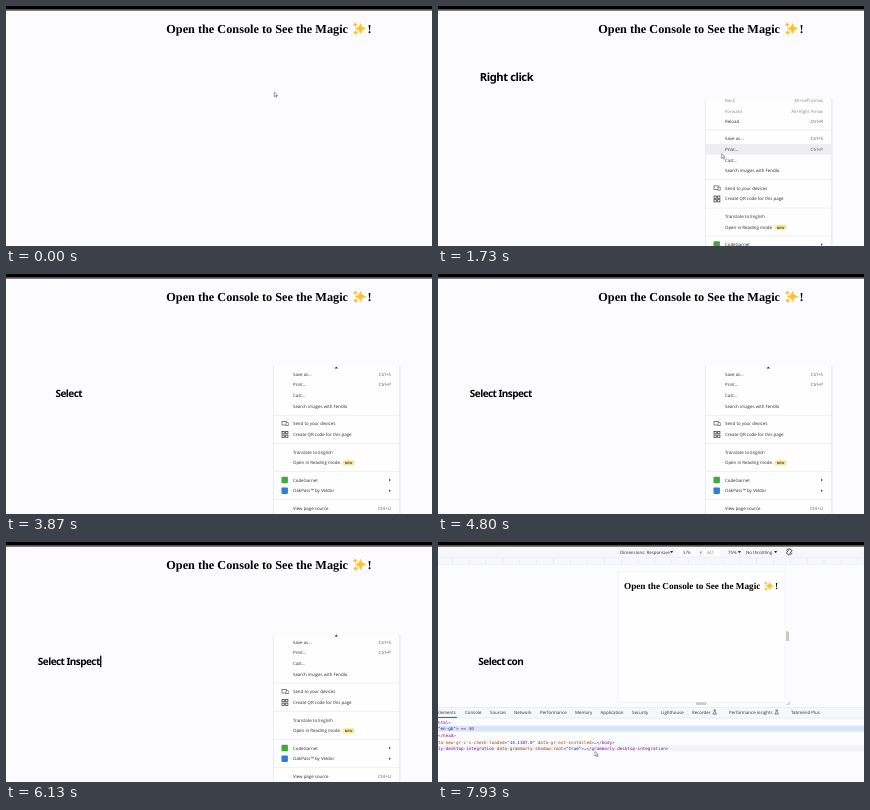
An HTML page that plays this animation: 426 by 240 pixels, repeating every 8000 ms.

```html
<!DOCTYPE html>
<html lang="en">
<head>
<meta charset="utf-8">
<title>Open the Console</title>
<style>
  html, body { margin: 0; width: 100%; height: 100%; overflow: hidden; background: #fcfcfe; }
  svg { display: block; width: 100vw; height: 100vh; }
  text { white-space: pre; text-rendering: geometricPrecision; }
  .caption { font-family: "Noto Sans", sans-serif; font-weight: 800; text-anchor: middle; }
  .menu text, .tools text { font: 4.4px "Open Sans", sans-serif; fill: #2c2c30; }
  .menu .key { text-anchor: end; fill: #55555a; }
  .menu .off { fill: #87878c; }
  .menu .badge { font-size: 3.2px; font-weight: 700; text-anchor: middle; fill: #5b4a10; }
  .tools .code { font: 4.26px "DejaVu Sans Mono", monospace; fill: #881280; }
  .tools .attr { fill: #994500; }
  .tools .val { fill: #1a1aa6; }
  svg text.title { font: bold 12.25px "Liberation Serif", serif; fill: #000; }
</style>
</head>
<body>
<svg id="stage" viewBox="0 0 426 240" preserveAspectRatio="none"></svg>
<script>
const LOOP = 8000, CUT_2 = 3070, CUT_3 = 6200;
const stage = document.getElementById('stage');

const rect = (x, y, w, h, fill, more = '') =>
  `<rect x="${x}" y="${y}" width="${w}" height="${h}" fill="${fill}" ${more}/>`;
const text = (x, y, str, more = '') => `<text x="${x}" y="${y}" ${more}>${str}</text>`;
const path = (d, fill, more = '') => `<path d="${d}" fill="${fill}" ${more}/>`;
const star = (x, y, r) => path(
  `M${x} ${y - r}Q${x + r * .18} ${y - r * .18} ${x + r} ${y}Q${x + r * .18} ${y + r * .18} ${x} ${y + r}` +
  `Q${x - r * .18} ${y + r * .18} ${x - r} ${y}Q${x - r * .18} ${y - r * .18} ${x} ${y - r}Z`,
  '#fdc02f', 'stroke="#fdc02f" stroke-width=".4"');
const down = (x, y) => path(`M${x} ${y}h3.2l-1.6 2.2z`, '#333');

const title =
  text(0, 0, 'Open the Console to See the Magic', 'class="title"') +
  star(194.2, -4.1, 5.3) + star(189, -7.8, 2.2) + star(189.4, 0, 2.4) +
  text(201.2, 0, '!', 'class="title"');

// Context menu: [centre y, label, shortcut, extra]
const rows = [
  [94, 'Back', 'Alt+Left arrow', 'off'],
  [105, 'Forward', 'Alt+Right Arrow', 'off'],
  [115.5, 'Reload', 'Ctrl+R'],
  [132.5, 'Save as...', 'Ctrl+S'],
  [143.2, 'Print...', 'Ctrl+P'],
  [154, 'Cast...'],
  [164.8, 'Search images with Fendlo'],
  [182, 'Send to your devices', '', 'device'],
  [192.8, 'Create QR code for this page', '', 'code'],
  [210.5, 'Translate to English'],
  [221.3, 'Open in Reading mode', '', 'new'],
  [238.5, 'CodeGarnet', '', '#43a83c'],
  [249.2, 'OakPass™ by Veldor', '', '#2b7fd6'],
  [266.5, 'View page source', 'Ctrl+U'],
  [277.3, 'Inspect']
];
const extras = {
  device: rect(276, 179.9, 4.6, 3.6, 'none', 'stroke="#555" stroke-width=".7"') +
    rect(280, 181.2, 2.2, 3, '#fff', 'stroke="#555" stroke-width=".6"'),
  code: [[276, 190], [279.6, 190], [276, 193.6], [279.6, 193.6]].map(([x, y]) =>
    rect(x, y, 2.3, 2.3, 'none', 'stroke="#444" stroke-width=".8"')).join(''),
  new: rect(336.5, 218.8, 12, 5, '#fbe7a0', 'rx="1"') +
    text(342.5, 222.6, 'NEW', 'class="badge"')
};
const menuRow = ([y, label, key = '', kind = '']) => {
  const dim = kind === 'off' ? 'off' : '';
  const addon = kind[0] === '#'
    ? rect(275.5, y - 3.2, 6.4, 6.4, kind, 'rx=".8"') + path(`M383 ${y - 1.3}l1.9 1.3l-1.9 1.3z`, '#6b3038')
    : extras[kind] || '';
  return text(287, y + 1.6, label, `class="${dim}"`) +
    text(385, y + 1.6, key, `class="key ${dim}"`) + addon;
};
const lines = [123.8, 173.4, 201.8, 229.8, 257.8]
  .map(y => rect(268, y, 126, .5, '#e2e2e8')).join('');

// Developer tools
const tabs = [[-1, 'Elements'], [27, 'Console'], [52, 'Sources'], [76, 'Network'],
  [102, 'Performance'], [137, 'Memory'], [162.5, 'Application'], [194, 'Security'],
  [223, 'Lighthouse'], [254, 'Recorder'], [291, 'Performance insights'], [353, 'Tabmend Plus']];
const flask = x => path(`M${x} 168h2.4m-1.7 0v1.6l-1.3 2.5h3.6l-1.3-2.5v-1.6`, 'none',
  'stroke="#444" stroke-width=".6"');
const span = (cls, str) => `<tspan class="${cls}">${str}</tspan>`;
const code = (y, str) => text(0, y, str, 'class="code"');
const ticks = Array.from({ length: 26 }, (_, i) =>
  rect(i * 16.9 + 14, i % 3 ? 18.5 : 15.5, .4, i % 3 ? 3.5 : 6.5, '#dddde2')).join('');

const toolbar =
  rect(0, 4, 426, 18.4, '#f6f7fb') +
  rect(0, 15, 426, .4, '#e6e6ea') + rect(0, 22.2, 426, .4, '#e6e6ea') + ticks +
  text(182, 11.6, 'Dimensions: Responsive') + down(232, 9) +
  rect(241.5, 6.2, 16, 7.6, '#fff') +
  text(245, 11.6, '576') + text(261.5, 11.6, '×') +
  rect(266, 6.2, 15.5, 7.6, '#fff') +
  text(268.5, 11.6, '441', 'opacity=".55"') +
  text(290, 11.6, '75%') + down(299.8, 9) +
  text(308, 11.6, 'No throttling') + down(336, 9) +
  rect(349.6, 7, 3.2, 5.6, 'none', 'rx=".6" stroke="#333" stroke-width=".8" transform="rotate(35 351.2 9.8)"') +
  path('M348.3 8.8q.4-2 2.3-2.2M354 10.8q-.4 2-2.3 2.2', 'none', 'stroke="#333" stroke-width=".6"');

const page =
  rect(180, 30, 167, 130, '#fefefe', 'stroke="#f0f0f4" stroke-width=".5"') +
  `<g transform="translate(186 47) scale(.75)">${title}</g>` +
  rect(348, 89.5, 3, 9.5, '#c9c9bd') + rect(258, 160.3, 10.5, 2.6, '#c9c9bd') +
  path('M348.5 163l3.4-3.4M350.4 163l1.5-1.5', 'none', 'stroke="#777" stroke-width=".5"');

const highlight =
  rect(180, 30, 166, 25.2, '#6fa8dc', 'opacity=".66"') +
  rect(180.5, 58, 48.5, 12.2, '#fff', 'rx="1.5" stroke="#c8c8d2" stroke-width=".6"') +
  path('M184 58l2.5-2.6l2.5 2.6z', '#fff') +
  text(184, 65.8, 'html', 'style="font-weight:700;fill:#881280"') +
  text(199.5, 65.8, '576 × 85.28');

const panel =
  rect(0, 165.5, 426, 75, '#fcfcfe') + rect(0, 165.3, 426, .5, '#d6d7dd') +
  rect(0, 165.8, 426, 10, '#f6f7fb') + rect(0, 175.8, 426, .5, '#d6d9e2') +
  rect(0, 174.9, 19, 1.1, '#1a73e8') +
  tabs.map(([x, name]) => text(x, 172, name)).join('') + flask(275.5) + flask(337.5) +
  rect(0, 183.6, 426, 6, '#dbe5fa') +
  '<rect id="codeHover" x="0" y="203.4" width="426" height="6" fill="#f1f4fb"/>' +
  code(181.8, span('', 'html&gt;')) +
  code(188.2, span('val', '"en-gb"') + '&gt;' + span('', ' == $0')) +
  code(194.9, '&lt;/head&gt;') +
  code(201.5, span('attr', 'ta-new-gr-c-s-check-loaded') + '=' + span('val', '"14.1107.0"') +
    span('attr', ' data-gr-ext-installed') + '&gt;…&lt;/body&gt;') +
  code(208, 'ly-desktop-integration' + span('attr', ' data-grammarly-shadow-root') + '=' +
    span('val', '"true"') + '&gt;…&lt;/grammarly-desktop-integration&gt;');

stage.innerHTML = `
  <defs>
    <clipPath id="menuClip"><rect id="clipBox" x="267" width="128" height="150"/></clipPath>
  </defs>
  ${rect(0, 0, 426, 240, '#fcfcfe')}
  <g id="plain" transform="translate(160.3 26.6)">${title}</g>
  <g id="menu" class="menu">
    ${rect(267.4, 91.5, 126.4, 152, '#fefefe')}
    ${rect(267, 92, .7, 148, '#e4e2e6')}${rect(393.5, 92, .8, 148, '#dcdae8')}
    <g clip-path="url(#menuClip)"><g id="list">
      <rect id="hover" x="268" width="125.6" height="10.6" fill="#eeeef1"/>
      ${lines}${rows.map(menuRow).join('')}
    </g></g>
    <g id="up">${path('M328.6 94.6h3.4l-1.7-2z', '#333')}</g>
  </g>
  <g id="tools" class="tools">${toolbar}${page}<g id="highlight">${highlight}</g>${panel}</g>
  <text id="caption" class="caption"></text>
  <rect id="caret" width="1.3" height="11.6" fill="#000"/>
  <path id="cursor" d="M0 0v4.6l1.1-1l.8 1.7l.8-.4l-.8-1.6h1.5z" fill="#fff" stroke="#444" stroke-width=".5"/>
  ${rect(0, 0, 426, 3.6, '#000')}${rect(0, 3.6, 426, 1, '#3a2a30')}`;

const el = {};
stage.querySelectorAll('[id]').forEach(n => el[n.id] = n);
const show = (node, on) => { node.style.display = on ? '' : 'none'; };
const set = (node, attrs) => { for (const k in attrs) node.setAttribute(k, attrs[k]); };

const scenes = [
  { at: 0, str: 'Right click', step: 148, x: 68.5, y: 75, size: 11.2, gap: -.45 },
  { at: CUT_2, str: 'Select Inspect', step: 118, x: 62.8, y: 123, size: 10, gap: -.55 },
  { at: CUT_3, str: 'Select console', step: 163, x: 62.8, y: 123, size: 10, gap: -.55 }
];

// Pointer stops: [time, x, y]
const route = [[0, 268.3, 86], [600, 268.3, 86], [1500, 283.7, 147.8], [1800, 283.7, 147.8],
  [2250, 288, 176], [2600, 288, 176], [2950, 290, 157], [3150, 290, 157], [3800, 312, 252],
  [7300, 128, 252], [7750, 157, 209.5], [8000, 157, 209.5]];
const ease = p => p * p * (3 - 2 * p);

function pointer(t) {
  const i = Math.max(1, route.findIndex(r => r[0] > t));
  const [t0, x0, y0] = route[i - 1], [t1, x1, y1] = route[i];
  const p = ease((t - t0) / (t1 - t0));
  return [x0 + (x1 - x0) * p, y0 + (y1 - y0) * p];
}

function drawCaption(t) {
  const s = scenes.filter(s => t >= s.at).pop();
  const age = t - s.at;
  const n = Math.min(s.str.length, Math.floor(age / s.step));
  el.caption.textContent = s.str.slice(0, n);
  el.caption.style.fontSize = s.size + 'px';
  el.caption.style.letterSpacing = s.gap + 'px';
  set(el.caption, { x: s.x, y: s.y });
  const half = n ? el.caption.getComputedTextLength() / 2 : 0;
  set(el.caret, { x: s.x + half + .3, y: s.y - 9.4 });
  show(el.caret, n > 0 && age % 1000 < 500);
}

function render(t) {
  const [x, y] = pointer(t);
  const tools = t >= CUT_3;
  const scroll = 32.5 * ease(Math.min(1, Math.max(0, (t - 2250) / 300)));
  const scrolled = scroll > 1;
  const over = rows.find(r => Math.abs(r[0] - scroll - y) <= 5.4);

  show(el.plain, !tools);
  show(el.menu, t >= 500 && !tools);
  show(el.tools, tools);
  show(el.highlight, t < 7550);
  show(el.codeHover, t >= 7650);
  show(el.up, scrolled);
  show(el.hover, over);
  if (over) set(el.hover, { y: over[0] - 5.3 });
  set(el.clipBox, { y: scrolled ? 97.5 : 92 });
  set(el.list, { transform: `translate(0 ${-scroll})` });
  set(el.cursor, { transform: `translate(${x} ${y})` });
  drawCaption(t);
}

const start = performance.now();
function tick() {
  render((performance.now() - start) % LOOP);
  requestAnimationFrame(tick);
}
tick();
</script>
</body>
</html>
```
